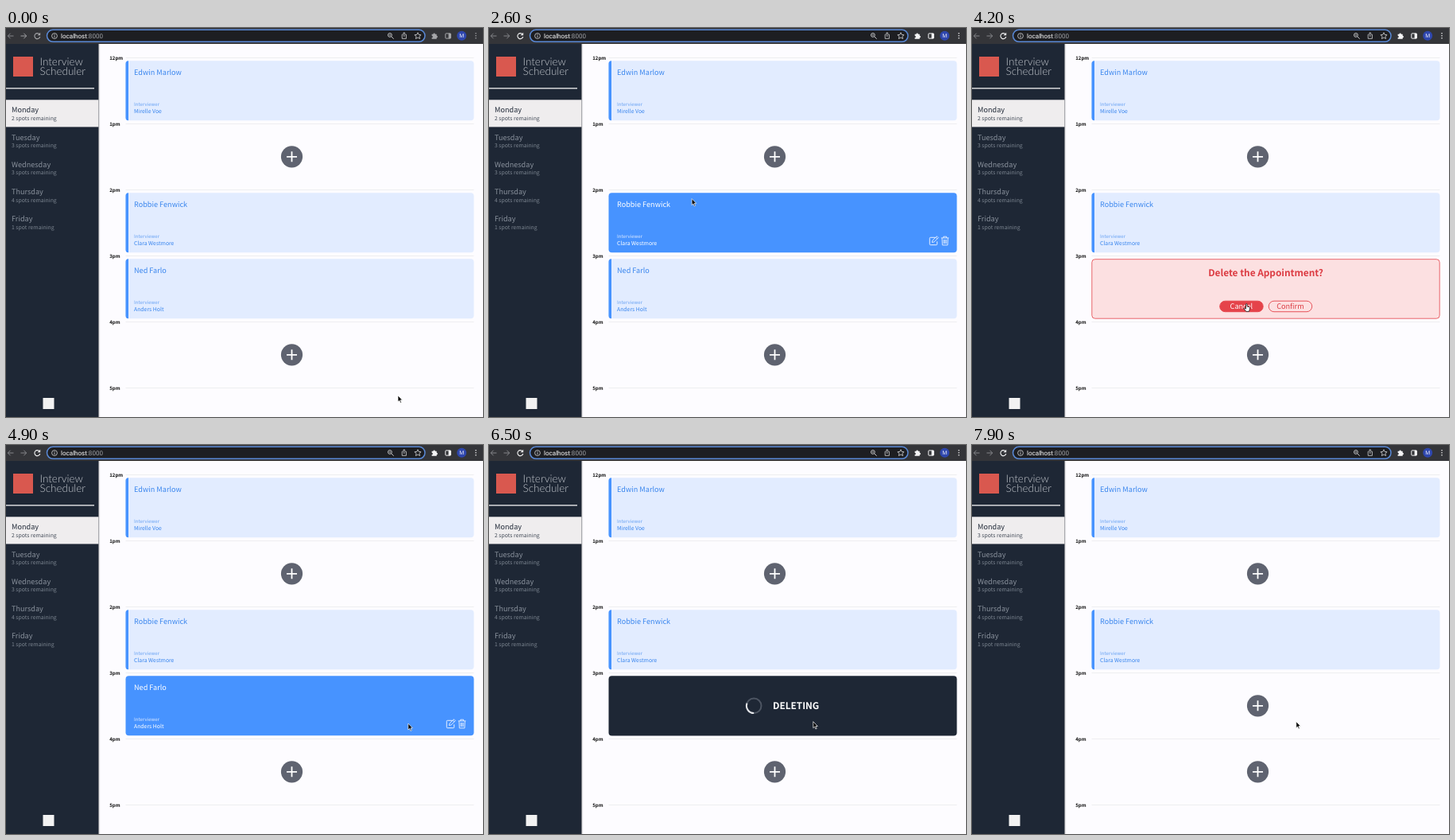
Animation, 600 px wide and 489 px high, one loop 8 s. Source, as an HTML page:

```html
<!DOCTYPE html>
<html lang="en">
<head>
<meta charset="utf-8">
<title>Interview Scheduler</title>
<style>
html, body { margin: 0; width: 100%; height: 100%; overflow: hidden; background: #fdfcff; }
svg { display: block; width: 600px; height: 489px; }
text { font-family: "Noto Sans CJK JP", "Noto Sans CJK SC", "Noto Sans", sans-serif; text-rendering: geometricPrecision; }
</style>
</head>
<body>
<svg id="stage" viewBox="0 0 600 489"></svg>
<script>
const LOOP = 8000, FOCUS = 2200;
const BLUE = '#4793ff', NAVY = '#1e2735', RED = '#e5434a';
const BIG = 9.15, SMALL = 6.87, HEAD = 11.8;
const STEP = 83, TOP = 41.2;
const stage = document.getElementById('stage');

const text = (x, y, size, fill, str, more = '') =>
  `<text x="${x}" y="${y}" font-size="${size}" fill="${fill}" ${more}>${str}</text>`;
const rect = (x, y, w, h, fill, r = 0, more = '') =>
  `<rect x="${x}" y="${y}" width="${w}" height="${h}" rx="${r}" fill="${fill}" ${more}/>`;
const circle = (x, y, r, fill, more = '') =>
  `<circle cx="${x}" cy="${y}" r="${r}" fill="${fill}" ${more}/>`;
const line = (d, stroke, w = 1, more = '') =>
  `<path d="${d}" fill="none" stroke="${stroke}" stroke-width="${w}" ${more}/>`;
const BOLD = 'font-weight="700"', MID = 'text-anchor="middle"';

// Pointer stops: time, x, y
const path = [
  [0, 493, 462], [300, 493, 462], [1300, 25.5, 116], [FOCUS, 25.5, 116],
  [3100, 574, 351.5], [3700, 574, 351.5], [4150, 345.3, 346.7], [4550, 345.3, 346.7],
  [5100, 574, 351.5], [5800, 574, 351.5], [6250, 407.8, 347.7], [LOOP, 407.8, 347.7]
];
// Third slot: start time and view
const views = [
  [0, 'card'], [3600, 'confirm'], [4450, 'card'],
  [5500, 'confirm'], [6400, 'deleting'], [7500, 'empty']
];

function pointerAt(t) {
  const i = path.findIndex(p => p[0] > t);
  const [t0, x0, y0] = path[i - 1], [t1, x1, y1] = path[i];
  const k = (t - t0) / (t1 - t0), e = k * k * (3 - 2 * k);
  return { x: x0 + (x1 - x0) * e, y: y0 + (y1 - y0) * e };
}
const within = (p, x, y, w, h) => p.x >= x && p.x <= x + w && p.y >= y && p.y <= y + h;

function toolbar(active) {
  const c = active ? '#f4f4f5' : '#a5a6a9', dim = '#85868a', light = '#d5d6d8';
  return rect(0, 0, 600, 20, '#343539') +
    rect(51.5, 2.3, 475.5, 15, '#1d1e22', 7.5, 'stroke="#5a89d6" stroke-width="1.5"') +
    line('M9.5 10H2.5M5.6 6.7 2.3 10l3.3 3.3', dim) +
    line('M18.5 10h7M22.4 6.7 25.7 10l-3.3 3.3', active ? dim : '#a0a1a4') +
    line('M42.3 8.1A3.5 3.5 0 1 0 42.8 11', c, 1.1) +
    `<path d="M43.2 5.8v3.5h-3.5z" fill="${c}"/>` +
    circle(61, 10, 3.4, 'none', `stroke="${light}" stroke-width=".8"`) +
    line('M61 9.5v2.3M61 7.9v.9', light, .9) +
    text(69, 12.7, 8.05, '#fff',
      'localhost<tspan fill="#9fa1a5">:8000</tspan>', 'style="font-family:Roboto,Inter,sans-serif"') +
    circle(482.9, 8.9, 2.4, 'none', `stroke="${light}" stroke-width=".9"`) +
    line('M484.7 10.7l3 3M481.8 8.9h2.2', light, .9) +
    line('M499.5 8.3h-1.3v5h5.2v-5h-1.3M500.8 11V5.8M499.1 7.3l1.7-1.7 1.7 1.7', light, .8) +
    line('M518 5.7l1.2 2.7 2.9.3-2.2 1.9.7 2.9-2.6-1.5-2.6 1.5.7-2.9-2.2-1.9 2.9-.3z', light, .8) +
    `<path d="M535.6 7.7h1.8a1.2 1.2 0 0 1 2.4 0h1.9v2.1a1.2 1.2 0 0 1 0 2.4v1.6h-6.1v-1.7a1.2 1.2 0 0 0 0-2.4z" fill="${c}"/>` +
    rect(552.8, 6.9, 6.6, 6.2, 'none', .6, `stroke="${c}"`) + rect(556.6, 6.9, 2.8, 6.2, c) +
    circle(573.2, 9.8, 6, '#2e46ad') +
    text(573.2, 12.2, 6.8, '#e6e9f8', 'M', MID + ' style="font-family:Roboto,sans-serif"') +
    [6.8, 9.8, 12.8].map(y => circle(591, y, .8, c)).join('');
}

function sidebar(spots) {
  const days = [['Monday', spots], ['Tuesday', 3], ['Wednesday', 3], ['Thursday', 4], ['Friday', 1]];
  const brand = 'font-weight="300" style="font-family:Lato,sans-serif"';
  return rect(116, 20, 1, 469, '#000', 0, 'opacity=".28"') +
    rect(117, 20, 1.2, 469, '#000', 0, 'opacity=".1"') +
    rect(0, 20, 116.4, 469, NAVY) +
    rect(9, 36, 25, 25, '#d9584f') +
    text(42.5, 47.4, 13.5, '#c3c7cd', 'Interview', brand) +
    text(42.5, 59.4, 13.5, '#c3c7cd', 'Scheduler', brand) +
    rect(0, 75.2, 111, 1.3, '#f2f2f3') +
    rect(0, 90.3, 116.4, 34.1, '#efedee') +
    days.map(([name, n], i) => {
      const y = 106.3 + 34.2 * i;
      return text(7, y, BIG, i ? '#8a929d' : '#222b39', name) +
        text(7, y + 9.7, SMALL, i ? '#7c8590' : '#444c58', `${n} spot${n > 1 ? 's' : ''} remaining`);
    }).join('') +
    rect(46.5, 465, 14, 14, '#f2f2f2');
}

function card(slot, name, host, p) {
  const y = TOP + STEP * slot;
  const over = p && within(p, 150.5, y, 438, 75);
  const ink = over ? '#fff' : '#3a86ee';
  let out = rect(150.5, y, 438, 75, over ? BLUE : '#e2ecff', 4);
  if (!over) out += `<path d="M154 ${y}v75a3.5 3.5 0 0 1-3.5-3.5v-68a3.5 3.5 0 0 1 3.5-3.5z" fill="${BLUE}"/>`;
  out += text(161, y + 18.2, BIG, ink, name) +
    text(161, y + 56.4, 6, over ? '#dce9ff' : '#68a2f3', 'Interviewer') +
    text(161, y + 65.7, SMALL, ink, host);
  if (over) out += `<g transform="translate(0 ${y + 60.3})">` +
    line('M561 -4.2h-5.7q-1 0-1 1v7.4q0 1 1 1h7.4q1 0 1-1v-3.4', '#e8f1ff') +
    line('M557.4 2l.5-2.4 5.4-5.4 1.9 1.9-5.4 5.4zM561.9-4.4l1.9 1.9', '#e8f1ff', .9) +
    line('M568.8-3.6h9.6M571.7-3.6v-1.7h3.8v1.7M569.9-3.6l.4 9h6.6l.4-9M572-1.5v5M573.6-1.5v5M575.2-1.5v5', '#e8f1ff', .9) + '</g>';
  return out;
}

function empty(slot) {
  const y = TOP + STEP * slot + 37.6;
  return circle(359.5, y, 13.6, '#5f6370') + line(`M353 ${y}h13M359.5 ${y - 6.5}v13`, '#fff', 1.8);
}

const buttons = [['Cancel', 311.7], ['Confirm', 373.2]];
const overButton = (p, x) => within(p, x, 343.2, 54.5, 13.5);

function confirmBox(p) {
  return rect(150.8, 290.7, 437.4, 74.5, '#fce0e1', 4, `stroke="${RED}" stroke-width=".8"`) +
    text(369.5, 311.8, HEAD, '#dc3c43', 'Delete the Appointment?', `${BOLD} ${MID}`) +
    buttons.map(([label, x]) => {
      const on = overButton(p, x);
      return rect(x, 343.2, 54.5, 13.5, on ? RED : 'none', 6.75, `stroke="${RED}" stroke-width=".9"`) +
        text(x + 27.2, 353.2, BIG, on ? '#fff' : '#dc3c43', label, MID);
    }).join('');
}

function deletingBox(t) {
  const turn = (t - 6500) * .36;
  return rect(150.5, 290.3, 438, 75.2, NAVY, 4) +
    circle(333.2, 327.8, 9.3, 'none', 'stroke="#4d5562" stroke-width="2"') +
    line('M333.2 337.1a9.3 9.3 0 0 1-8.7-12.5', '#e4e6e9', 2, `transform="rotate(${turn} 333.2 327.8)"`) +
    text(357, 332.1, HEAD, '#fff', 'DELETING', BOLD);
}

function pointer(p, hand) {
  const d = hand
    ? 'M-.8.8q0-.9.8-.9t.8.9v2.6l2.6.6q1 .3.9 1.3l-.5 2.5-.7 1.9h-3.6l-2.8-3.6q-.2-1 .8-.8l1.7 1.1z'
    : 'M0 0v8l1.8-1.7 1.3 3 1.3-.6-1.3-2.9h2.5z';
  const look = hand ? 'fill="#fff" stroke="#111" stroke-width=".8"' : 'fill="#000" stroke="#fff" stroke-width=".7"';
  return `<path transform="translate(${p.x} ${p.y})" d="${d}" ${look} stroke-linejoin="round"/>`;
}

function draw(t) {
  const p = pointerAt(t), live = t >= FOCUS && p;
  const view = views.filter(v => v[0] <= t).pop()[1];
  const hours = ['12pm', '1pm', '2pm', '3pm', '4pm', '5pm'].map((h, i) =>
    text(130.2, 40.2 + STEP * i, 6.1, '#111', h, BOLD) +
    rect(150.5, 37 + STEP * i, 438, .9, '#ececef')).join('');
  const third = {
    card: () => card(3, 'Ned Farlo', 'Anders Holt', live),
    confirm: () => confirmBox(p),
    deleting: () => deletingBox(t),
    empty: () => empty(3)
  }[view]();
  const hand = view === 'card' && live && within(p, 568, 345, 12, 13) ||
    view === 'confirm' && buttons.some(b => overButton(p, b[1]));
  stage.innerHTML = rect(0, 0, 600, 489, '#fdfcff') + hours +
    card(0, 'Edwin Marlow', 'Mirelle Voe', live) + empty(1) +
    card(2, 'Robbie Fenwick', 'Clara Westmore', live) + third + empty(4) +
    sidebar(view === 'empty' ? 3 : 2) + toolbar(!!live) + pointer(p, hand);
}

const start = performance.now();
function tick() {
  draw((performance.now() - start) % LOOP);
  requestAnimationFrame(tick);
}
tick();
</script>
</body>
</html>
```
